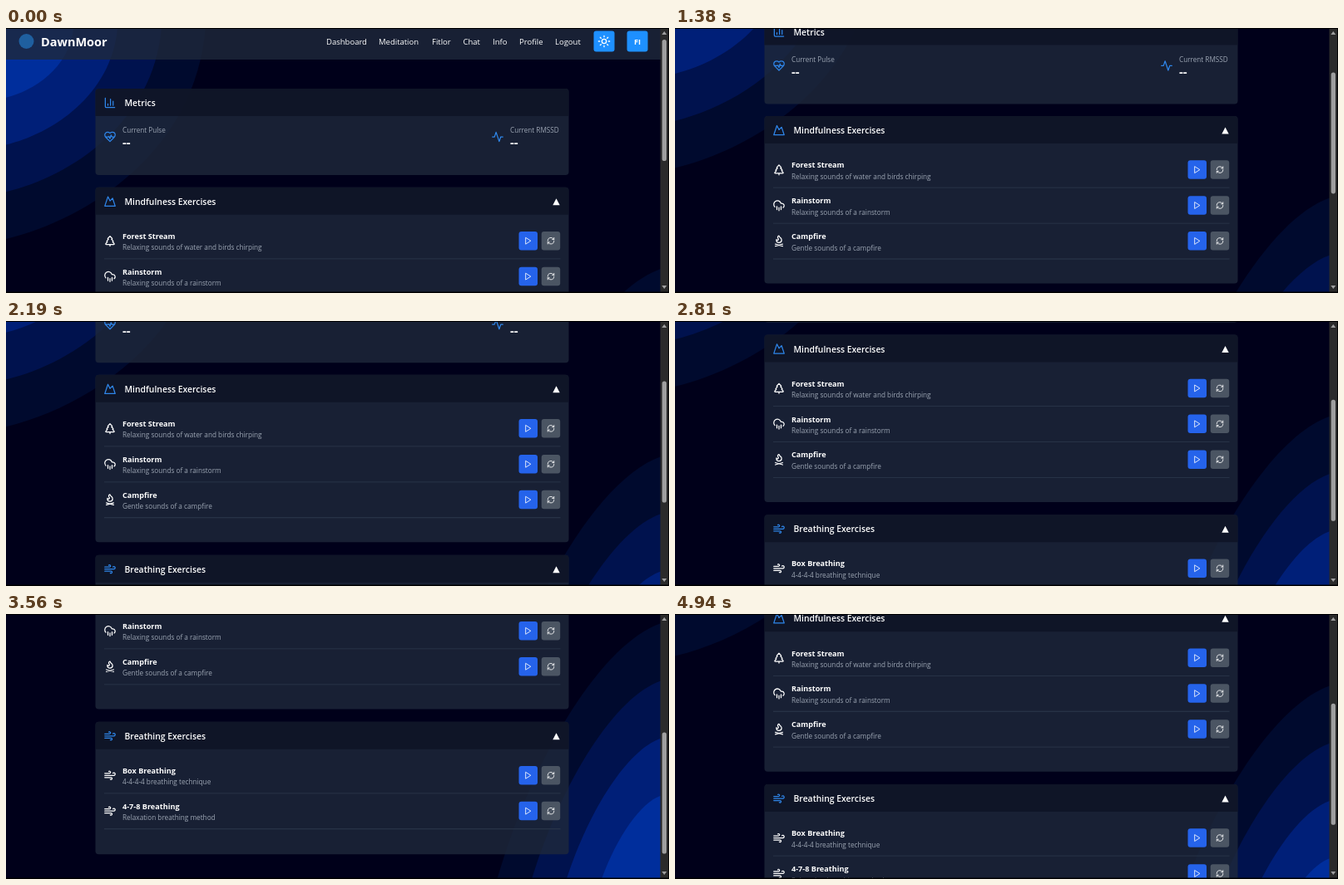
Animation, 797 px wide and 319 px high, one loop 5 s. Source, as an HTML page with a canvas:

```html
<!DOCTYPE html>
<html lang="en">
<head>
<meta charset="utf-8">
<title>Wellness dashboard</title>
<style>
  html, body { margin: 0; width: 100%; height: 100%; overflow: hidden; background: #00001a; }
  canvas { display: block; width: 797px; height: 319px; }
</style>
</head>
<body>
<canvas id="stage"></canvas>
<script>
const W = 797, H = 319, LOOP = 5000, STEP = 62.5;
const VIEW_W = 787, PAGE_H = 636;
const BLUE = '#2f86ea', WHITE = '#fff', MUTED = '#9ca5b3';
const PANEL = 'rgba(30,41,59,.8)', HEAD = 'rgba(14,20,38,.88)';

const canvas = document.getElementById('stage');
const ctx = canvas.getContext('2d');
const ratio = window.devicePixelRatio || 1;
canvas.width = Math.round(W * ratio);
canvas.height = Math.round(H * ratio);

// Icon outlines on a 24 unit grid
const icons = Object.fromEntries(Object.entries({
  chart: 'M3 3v16a2 2 0 0 0 2 2h16M18 17V9M13 17V5M8 17v-3',
  heart: 'M19 14c1.5-1.5 3-3.2 3-5.5A5.5 5.5 0 0 0 16.5 3c-1.8 0-3 .5-4.5 2-1.5-1.5-2.7-2-4.5-2A5.5 5.5 0 0 0 2 8.5c0 2.3 1.5 4 3 5.5l7 7ZM3.2 12H9.5l.5-1 2 4.5 2-7 1.5 3.5h5.3',
  pulse: 'M22 12h-4l-3 9L9 3l-3 9H2',
  mountain: 'M8 3l4 8 5-5 5 15H2Z',
  tree: 'M17 14l3 3.3a1 1 0 0 1-.7 1.7H4.7a1 1 0 0 1-.7-1.7L7 14h-.3a1 1 0 0 1-.7-1.7L9 9h-.2A1 1 0 0 1 8 7.3L12 3l4 4.3a1 1 0 0 1-.8 1.7H15l3 3.3a1 1 0 0 1-.7 1.7ZM12 22v-3',
  rain: 'M4 14.9A7 7 0 1 1 15.7 8h1.8a4.5 4.5 0 0 1 2.5 8.2M16 14v6M8 14v6M12 16v6',
  fire: 'M12 2c1 3 2.5 3.5 3.5 4.5A5 5 0 0 1 17 10a5 5 0 1 1-10 0c0-.3 0-.6.1-.9a2 2 0 1 0 3.3-2C8 4.5 11 2 12 2ZM5 22l14-4M5 18l14 4',
  wind: 'M17.7 7.7a2.5 2.5 0 1 1 1.8 4.3H2M9.6 4.6A2 2 0 1 1 11 8H2M12.6 19.4A2 2 0 1 0 14 16H2',
  play: 'M6 3l14 9-14 9Z',
  refresh: 'M3 12a9 9 0 0 1 9-9 9.7 9.7 0 0 1 6.7 2.7L21 8M21 3v5h-5M21 12a9 9 0 0 1-9 9 9.7 9.7 0 0 1-6.7-2.7L3 16M8 16H3v5',
  sun: 'M16 12a4 4 0 1 1-8 0 4 4 0 1 1 8 0M12 2v2M12 20v2M5 5l1.4 1.4M17.6 17.6L19 19M2 12h2M20 12h2M6.4 17.6L5 19M19 5l-1.4 1.4'
}).map(([name, d]) => [name, new Path2D(d)]));

// Scroll position over time: [ms, px]
const keys = [[0, 0], [800, .5], [880, 3], [1380, 86], [2190, 127],
  [2810, 175], [3560, 278.5], [3950, 308], [4350, 308], [4940, 203]];
const slopes = keys.slice(1).map(([t, s], i) => (s - keys[i][1]) / (t - keys[i][0]));
const tangents = keys.map((_, i) => {
  if (i === 0) return 0;
  const a = slopes[i - 1], b = slopes[i];
  if (b === undefined) return a;
  return a * b > 0 ? 2 * a * b / (a + b) : 0;
});

// Monotone cubic interpolation
function scrollAt(t) {
  let i = 0;
  while (i < keys.length - 2 && t > keys[i + 1][0]) i++;
  const [t0, s0] = keys[i], [t1, s1] = keys[i + 1];
  const d = t1 - t0, u = Math.min(1, (t - t0) / d), v = 1 - u;
  return s0 * (1 + 2 * u) * v * v + tangents[i] * d * u * v * v
    + s1 * u * u * (3 - 2 * u) - tangents[i + 1] * d * u * u * v;
}

function text(str, x, y, size, color = WHITE, weight = 400, align = 'left') {
  ctx.font = `${weight} ${size}px "Open Sans", "Noto Sans", sans-serif`;
  ctx.fillStyle = color;
  ctx.textAlign = align;
  ctx.fillText(str, x, y + size * .357);
}

function box(x, y, w, h, color, radius = 0) {
  ctx.fillStyle = color;
  ctx.beginPath();
  ctx.roundRect(x, y, w, h, radius);
  ctx.fill();
}

function icon(name, cx, cy, size = 15, color = WHITE) {
  ctx.save();
  ctx.translate(cx - size / 2, cy - size / 2);
  ctx.scale(size / 24, size / 24);
  ctx.strokeStyle = color;
  ctx.lineWidth = 2;
  ctx.lineCap = ctx.lineJoin = 'round';
  ctx.stroke(icons[name]);
  ctx.restore();
}

function triangle(cx, cy, w, h, color) {
  ctx.fillStyle = color;
  ctx.beginPath();
  ctx.moveTo(cx - w / 2, cy + h / 2);
  ctx.lineTo(cx, cy - h / 2);
  ctx.lineTo(cx + w / 2, cy + h / 2);
  ctx.fill();
}

// Nested layers shrinking towards a page corner
function cornerWaves(cx, cy, shrink, [startY, c1x, c1y, c2x, c2y, endX]) {
  ['#000a2e', '#00124e', '#001f78', '#002e9c'].forEach((color, i) => {
    const k = 1 - shrink * i;
    ctx.save();
    ctx.translate(cx, cy);
    ctx.scale(k, k);
    ctx.fillStyle = color;
    ctx.beginPath();
    ctx.moveTo(0, 0);
    ctx.lineTo(0, startY);
    ctx.bezierCurveTo(c1x, c1y, c2x, c2y, endX, 0);
    ctx.fill();
    ctx.restore();
  });
}

function background() {
  box(0, -10, VIEW_W, PAGE_H + 20, '#00001a');
  cornerWaves(0, -4, .22, [258, 100, 234, 230, 150, 240]);
  cornerWaves(VIEW_W, PAGE_H, .2, [-346, -75, -320, -165, -170, -207]);
}

function navbar() {
  box(0, -5, VIEW_W, 43, PANEL);
  ctx.fillStyle = '#1f5f9f';
  ctx.beginPath();
  ctx.arc(24.5, 16, 9, 0, 7);
  ctx.fill();
  text('DawnMoor', 42, 17, 14.5, WHITE, 700);
  [['Dashboard', 385], ['Meditation', 448], ['Fitlor', 512], ['Chat', 549.5],
    ['Info', 585], ['Profile', 617], ['Logout', 660]]
    .forEach(([label, x]) => text(label, x, 17, 9.5));
  box(706.5, 3.5, 25, 25, '#1e90ff', 3);
  icon('sun', 719, 16, 16);
  box(746.5, 3.5, 25, 25, '#1e90ff', 3);
  text('FI', 759, 16.5, 9.2, WHITE, 700, 'center');
}

function card(y, h, title, glyph) {
  box(107.5, y, 569, h, PANEL, 4);
  box(107.5, y, 569, 33, HEAD, [4, 4, 0, 0]);
  icon(glyph, 125, y + 17, 15, BLUE);
  text(title, 142.5, y + 17.5, 10.4, WHITE, 600);
}

function metric(x, label, glyph) {
  icon(glyph, x, 131, 15, BLUE);
  text(label, x + 15, 123.5, 8.2, MUTED);
  text('--', x + 15, 138, 15, WHITE, 700);
}

function exercises(y, h, title, glyph, rows) {
  card(y, h, title, glyph);
  triangle(661.5, y + 17.5, 8.4, 8, WHITE);
  rows.forEach(([name, note, rowIcon], i) => {
    const cy = y + 64.5 + i * 42.9;
    icon(rowIcon, 125, cy);
    text(name, 140, cy - 5.5, 9.1, WHITE, 700);
    text(note, 140, cy + 8.2, 8.23, MUTED);
    box(616.5, cy - 11.3, 22.5, 22.5, '#2563eb', 3);
    icon('play', 627.5, cy, 10);
    box(643.7, cy - 11.3, 22.5, 22.5, '#4b5563', 3);
    icon('refresh', 655, cy, 10);
    box(118, cy + 21.2, 548.5, .8, '#2c384c');
  });
}

function page() {
  background();
  navbar();
  card(73, 104, 'Metrics', 'chart');
  metric(125, 'Current Pulse', 'heart');
  metric(591, 'Current RMSSD', 'pulse');
  exercises(191.7, 201.5, 'Mindfulness Exercises', 'mountain', [
    ['Forest Stream', 'Relaxing sounds of water and birds chirping', 'tree'],
    ['Rainstorm', 'Relaxing sounds of a rainstorm', 'rain'],
    ['Campfire', 'Gentle sounds of a campfire', 'fire']
  ]);
  exercises(408.5, 159.5, 'Breathing Exercises', 'wind', [
    ['Box Breathing', '4-4-4-4 breathing technique', 'wind'],
    ['4-7-8 Breathing', 'Relaxation breathing method', 'wind']
  ]);
}

function scrollbar(scroll) {
  box(786.5, 0, 9.5, H, '#2b2b2b');
  triangle(791.3, 6, 6, 4, '#9f9f9f');
  triangle(791.3, 312, 6, -4, '#9f9f9f');
  box(788.7, 14 + scroll * .461, 5.3, 146, '#9f9f9f', 2.6);
}

function render(now) {
  const frame = Math.floor((now % LOOP + 4) / STEP) % (LOOP / STEP);
  const scroll = scrollAt(frame * STEP);
  ctx.setTransform(ratio, 0, 0, ratio, 0, 0);
  box(0, 0, W, H, '#000');
  ctx.save();
  ctx.translate(0, -scroll);
  page();
  ctx.restore();
  scrollbar(scroll);
  box(0, 0, W, 1, '#000');
  box(0, 317.5, W, 2, '#000');
  box(796, 0, 1, H, '#000');
}

const start = performance.now();
function tick() {
  render(performance.now() - start);
  requestAnimationFrame(tick);
}
tick();
</script>
</body>
</html>
```
